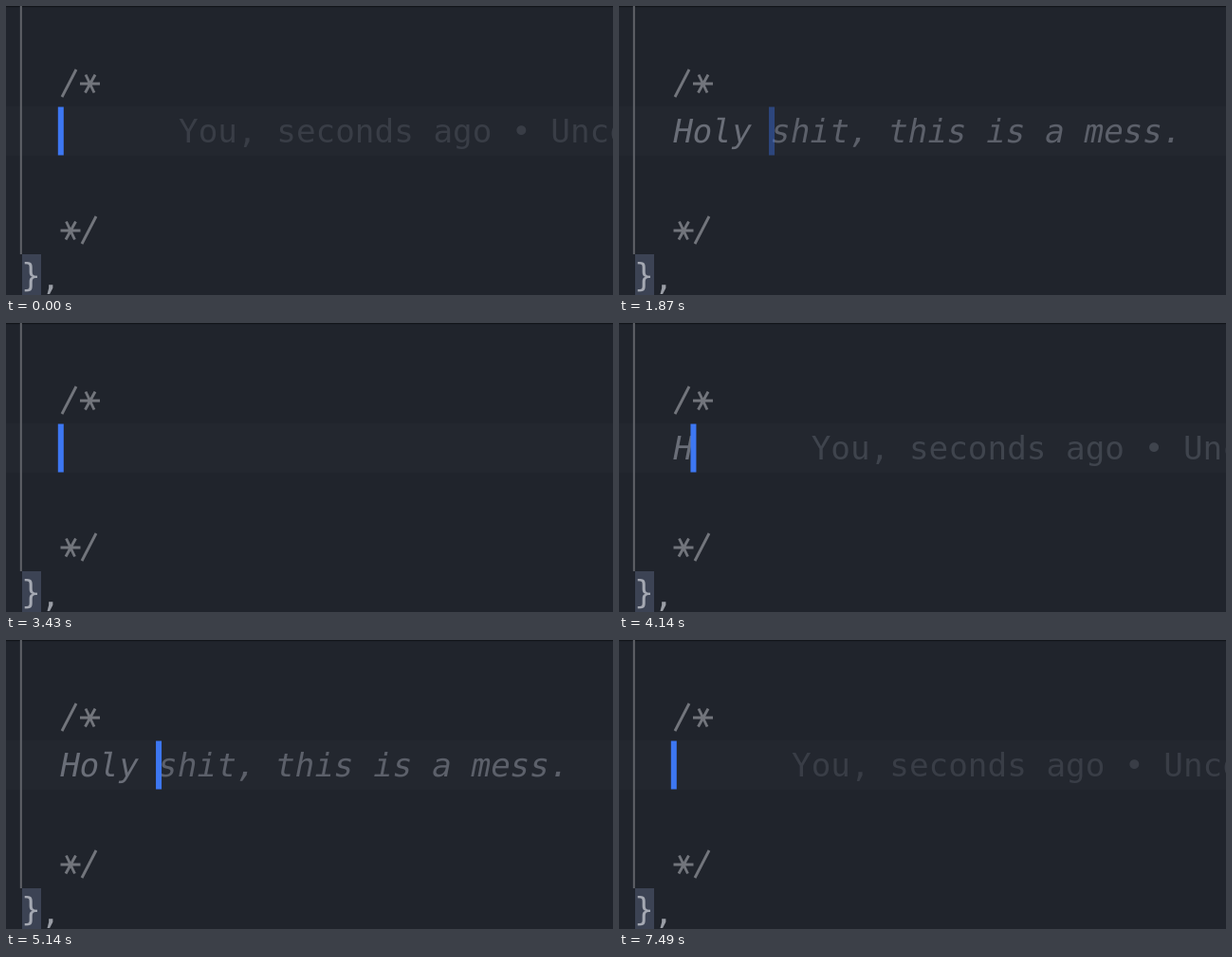
These frames come from a looping animation (640 by 305 pixels, 7.56 s). An HTML page:

```html
<!DOCTYPE html>
<html lang="en">
<head>
<meta charset="utf-8">
<title>Code comment</title>
<style>
  html, body { margin: 0; width: 100%; height: 100%; overflow: hidden; background: #20242c; }
  svg { display: block; width: 100%; height: 100%; }
  text { font: 34.3px "DejaVu Sans Mono", monospace; white-space: pre; }
  .soft { filter: blur(.6px); }
  .mark { fill: none; stroke: #72757c; stroke-width: 2.9; }
</style>
</head>
<body>
<svg viewBox="0 0 640 305" preserveAspectRatio="none">
  <rect width="640" height="305" fill="#20242c"/>
  <rect y="106" width="640" height="52" fill="#23272f"/>
  <rect width="640" height="1.2" fill="#12151a"/>
  <g class="soft">
    <rect x="14.8" width="2" height="262" fill="#606369"/>
    <rect x="17" y="262" width="20" height="43" fill="#3c4354"/>
    <g class="mark">
      <path d="M59 96L74 67M78 82H99M83.5 91.5L94 72.5M84 72.5L93 91.5"/>
      <path d="M80 251L95 222M57.5 237H78.5M63 246.5L73.5 227.5M63.5 227.5L72.5 246.5"/>
    </g>
    <text x="16" y="296" fill="#a5a9b3">}<tspan fill="#9a9ea6" y="299">,</tspan></text>
    <text id="note" y="144" fill="#3f444d">You, seconds ago • Uncommitted changes</text>
    <g transform="translate(55 144) skewX(-11)">
      <text id="typed" fill="#6a6e78"></text>
      <text id="ghost" x="103.25" fill="#5c606a">shit, this is a mess.</text>
    </g>
    <rect id="caret" y="106.5" width="6" height="51" fill="#3d77f2"/>
  </g>
</svg>
<script>
  const LOOP = 7560, COL = 20.65, FADE = 75, LEAD = 70;
  const WORD = 'Holy ';

  // blink lists the times at which the caret goes off, on, off, ...
  const passes = [
    { start: -LEAD, keys: [500, 660, 820, 1220, 1290], noteEnd: 580, ghost: 1440,
      blink: [100, 500, 1800, 2210, 2730, 3080], clear: 3080 },
    { start: 3570, keys: [4140, 4320, 4500, 4900, 4980], noteEnd: 4230, ghost: 5060,
      blink: [3710, 4140, 5540, 6020, 6510, 6960], clear: 6960 }
  ];
  const SOFT_BLINKS = [1, 3, 4];

  const $ = id => document.getElementById(id);
  const [note, typed, ghost, caret] = ['note', 'typed', 'ghost', 'caret'].map($);
  const passed = (times, t) => times.filter(x => x <= t).length;
  const appear = (t, at, mid) => t < at ? 0 : t < at + FADE ? mid : 1;

  function caretAlpha(p, t) {
    const n = passed(p.blink, t);
    const soft = SOFT_BLINKS.includes(n) && t < p.blink[n - 1] + FADE;
    return soft ? 0.4 : 1 - n % 2;
  }

  function draw(time) {
    let t = time % LOOP;
    if (t >= LOOP - LEAD) t -= LOOP;
    const p = passes[t < passes[1].start ? 0 : 1];
    const count = t < p.clear + 70 ? passed(p.keys, t) : 0;

    typed.textContent = WORD.slice(0, count);
    ghost.setAttribute('opacity', t < p.clear ? appear(t, p.ghost, 0.65) : 0);
    note.setAttribute('x', 182 + count * COL);
    note.setAttribute('opacity', t < p.noteEnd ? appear(t, p.start, 0.8) : 0);
    caret.setAttribute('x', 54.8 + count * COL);
    caret.setAttribute('opacity', caretAlpha(p, t));
  }

  const begin = performance.now();
  function tick() {
    draw(performance.now() - begin);
    requestAnimationFrame(tick);
  }
  tick();
</script>
</body>
</html>
```
